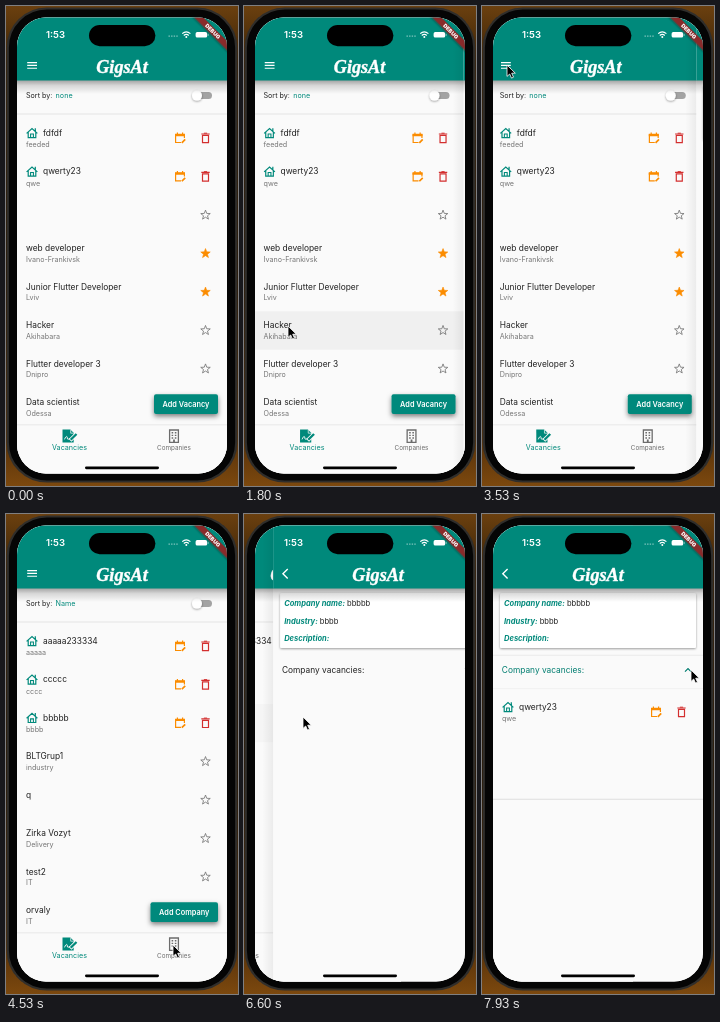
An HTML page for the animation above (8000 ms loop, 232 px wide and 480 px high).

```html
<!DOCTYPE html>
<html lang="en">
<head>
<meta charset="utf-8">
<title>Job board app</title>
<style>
  html, body { margin: 0; width: 100%; height: 100%; overflow: hidden; background: #2b1a06; }
  svg { display: block; width: 100vw; height: 100vh; }
  text { font-family: Inter, Roboto, sans-serif; white-space: pre; }
  .logo { font: italic bold 18.2px "Liberation Serif", "Noto Serif", serif; }
</style>
</head>
<body>
<svg id="stage" viewBox="0 0 232 480"></svg>
<script>
const LOOP = 8000, W = 210;
const TEAL = '#00897b', ORANGE = '#fb8c00', RED = '#d32f2f', GREY = '#757575', INK = '#212121', PAPER = '#fafafa';
const ROW = 38.45;

// Drawing helpers
const text = (x, y, s, size, fill = INK, more = '') =>
  `<text x="${x}" y="${y}" font-size="${size}" fill="${fill}" ${more}>${s}</text>`;
const rect = (x, y, w, h, fill, more = '') =>
  `<rect x="${x}" y="${y}" width="${w}" height="${h}" fill="${fill}" ${more}/>`;
const line = (d, color, width = 1, more = '') =>
  `<path d="${d}" fill="none" stroke="${color}" stroke-width="${width}" ${more}/>`;
const at = (x, y, body, more = '') => `<g transform="translate(${x} ${y})" ${more}>${body}</g>`;

// Icons, centred on 0,0
const house = line('M-5.4 .4L0-4.5 5.4.4M-3.8-1V4.6H3.8V-1M3.3-4.8V-1.8', TEAL, 1.2) +
  line('M-1.4 4.6V1H1.4V4.6', TEAL, 1.1);
const calendar = line('M1 4.5H-4.4V-3.6H4.4V0', ORANGE, 1.2) +
  line('M-5-2.8H5', ORANGE, 2) + line('M-2.6-5.4V-3M2.6-5.4V-3', ORANGE, 1.2) +
  line('M1.8 4.8L5.2 1.4', ORANGE, 1.7);
const bin = line('M-3-2.6V4.6H3V-2.6Z', RED, 1.2) +
  line('M-4.2-4H4.2', RED, 1.2) + line('M-1.6-4.8H1.6', RED, 1);
const starPath = 'M' + Array.from({ length: 10 }, (_, i) => {
  const r = i % 2 ? 2.1 : 5, a = i * Math.PI / 5;
  return (r * Math.sin(a)).toFixed(2) + ' ' + (-r * Math.cos(a)).toFixed(2);
}).join('L') + 'Z';
const star = full => full
  ? `<path d="${starPath}" fill="${ORANGE}" stroke="${ORANGE}" stroke-width=".6"/>`
  : line(starPath, '#777', .85);
const sheet = '<path d="M-7-6.5H.8L4.2-3.2V6.5H-7Z" fill="currentColor"/>' +
  line('M1.2-6V-2.8H4.2', PAPER, .7) +
  line('M-5 3.4C-3.4-.6-2.2 0-2.2 2S-.8 3.2.4 2.4', PAPER, .9) +
  line('M.6 4.4L7.4-2.4', PAPER, 4) + line('M1.2 3.8L7-2', 'currentColor', 2.3);
const tower = line('M-4.4-6H4.4V6.3H-4.4Z', 'currentColor', 1.3) +
  line('M-2.4-3.2H2.4M-2.4-.6H2.4M-2.4 2H2.4', 'currentColor', 1.4, 'stroke-dasharray="1.6"') +
  line('M0 6.4V3.6', 'currentColor', 1.8);

const header = back => rect(11, 74, W, 14, 'url(#drop)') + rect(11, 11, W, 63.5, TEAL) +
  (back ? line('M25.6 55L20.8 59.8 25.6 64.6', '#fff', 1.4)
        : line('M21.2 56.6H31M21.2 59.4H31M21.2 62.2H31', '#fff', 1.1)) +
  text(116, 66.5, 'GigsAt', 18.2, '#fff', 'class="logo" text-anchor="middle" stroke="#fff" stroke-width=".4"');

const tools = y => at(174, y, calendar) + at(199.5, y, bin);

// One list row: [title, subtitle, kind], kind is own | fav | plain
const row = ([title, sub, kind], i) => {
  const y = 127 + ROW * i, own = kind === 'own';
  return (own ? at(26, y, house) + tools(y + 5) : at(199.5, y + 5.2, star(kind === 'fav'))) +
    text(own ? 37 : 20, y + 3, title, 8.4) + text(20, y + (own ? 14.1 : 13.4), sub, 7.15, GREY);
};

const listBody = (sort, rows, button, bx) =>
  text(19.9, 92, 'Sort by:', 7.2) + text(49.6, 92, sort, 7.2, TEAL) +
  rect(187.5, 86, 18.5, 7, '#a3a3a3', 'rx="3.5"') +
  '<circle cx="191" cy="89.6" r="5" fill="#fff" filter="url(#soft)"/>' +
  rect(11, 107.6, W, .8, '#dedede') + rows.map(row).join('') +
  rect(bx, 388.3, 212 - bx, 19.7, TEAL, 'rx="2" filter="url(#raised)"') +
  text((bx + 212) / 2, 400.8, button, 7.35, '#fff', 'text-anchor="middle" font-weight="600"');

const vacancies = [
  ['fdfdf', 'feeded', 'own'], ['qwerty23', 'qwe', 'own'], ['', '', 'plain'],
  ['web developer', 'Ivano-Frankivsk', 'fav'], ['Junior Flutter Developer', 'Lviv', 'fav'],
  ['Hacker', 'Akihabara', 'plain'], ['Flutter developer 3', 'Dnipro', 'plain'],
  ['Data scientist', 'Odessa', 'plain']];
const companies = [
  ['aaaaa233334', 'aaaaa', 'own'], ['ccccc', 'cccc', 'own'], ['bbbbb', 'bbbb', 'own'],
  ['BLTGrup1', 'industry', 'plain'], ['q', '', 'plain'], ['Zirka Vozyt', 'Delivery', 'plain'],
  ['test2', 'IT', 'plain'], ['orvaly', 'IT', 'plain']];

const tab = (id, x, icon, label) => `<g id="${id}">` + at(x, 430, icon) +
  `<text x="${x}" y="443.7" text-anchor="middle" fill="currentColor">${label}</text></g>`;

const card = fields => rect(18, 79, 196, 55, '#fff', 'rx="1.5" filter="url(#soft)"') +
  fields.map(([name, value], i) =>
    `<text x="22" y="${92.1 + i * 17.6}" font-size="7.55" fill="${INK}">` +
    `<tspan fill="${TEAL}" font-weight="700" font-style="italic">${name}:</tspan> ${value}</text>`).join('');

document.getElementById('stage').innerHTML = `
<defs>
  <linearGradient id="wall" x2="0" y2="1">
    <stop offset="0" stop-color="#6b400f"/><stop offset=".12" stop-color="#3a2207"/>
    <stop offset=".55" stop-color="#2a1804"/><stop offset=".9" stop-color="#55310a"/>
    <stop offset="1" stop-color="#7c480e"/>
  </linearGradient>
  <linearGradient id="drop" x2="0" y2="1">
    <stop offset="0" stop-opacity=".36"/><stop offset=".4" stop-opacity=".14"/>
    <stop offset="1" stop-opacity="0"/>
  </linearGradient>
  <linearGradient id="edge">
    <stop offset="0" stop-opacity="0"/><stop offset="1" stop-opacity=".06"/>
  </linearGradient>
  <filter id="soft" x="-30%" y="-30%" width="160%" height="160%">
    <feDropShadow dx="0" dy=".9" stdDeviation=".9" flood-opacity=".4"/></filter>
  <filter id="raised" x="-20%" y="-60%" width="140%" height="240%">
    <feDropShadow dx="0" dy="2.4" stdDeviation="2.8" flood-opacity=".5"/></filter>
  <clipPath id="screen"><rect x="11" y="11.5" width="${W}" height="456" rx="29"/></clipPath>
  <clipPath id="fold"><rect id="foldBox" x="11" y="171" width="${W}" height="0"/></clipPath>
</defs>
${rect(0, 0, 232, 480, 'url(#wall)')}
${rect(1.8, 2.5, 228.4, 473, '#050505', 'rx="39" stroke="#302e2b" stroke-width="2.2"')}
<g clip-path="url(#screen)">
  ${rect(11, 11, W, 457, PAPER)}
  <g id="base">
    ${rect(11, 11, W, 457, PAPER)}
    ${rect(11, 0, W, ROW, '#000', 'id="press"')}
    <g id="vac">${listBody('none', vacancies, 'Add Vacancy', 148)}</g>
    <g id="com">${listBody('Name', companies, 'Add Company', 144.5)}</g>
    ${rect(11, 418.5, W, 50, PAPER)}${rect(11, 418.5, W, .8, '#e4e4e4')}
    ${tab('tabVac', 63.5, sheet, 'Vacancies')}${tab('tabCom', 168, tower, 'Companies')}
    ${header(false)}
  </g>
  <g id="detail">
    ${rect(0, 11, 11, 457, 'url(#edge)')}
    ${rect(11, 11, W, 457, PAPER)}
    <g id="job">${card([['Title', 'Hacker'], ['City', 'Akihabara'], ['Description', 'lorem ipsum']])}</g>
    <g id="firm">
      ${card([['Company name', 'bbbbb'], ['Industry', 'bbbb'], ['Description', '']])}
      ${text(19.8, 159, 'Company vacancies:', 8.35, INK, 'id="foldTitle"')}
      <g id="arrow">${line('M-3-1.6L0 1.4 3-1.6', 'currentColor', 1.2)}</g>
      <g clip-path="url(#fold)"><g id="foldBody">
        ${rect(11, 174.5, W, .6, '#ececec')}
        ${at(0, 66, row(['qwerty23', 'qwe', 'own'], 0))}
      </g></g>
      <g id="rules">${rect(11, 140.8, W, .7, '#e4e4e4')}<rect id="foldEnd" x="11" width="${W}" height=".8" fill="#d8d8d8"/></g>
    </g>
    ${header(true)}
  </g>
  ${text(40, 32.2, '1:53', 9.6, '#fff', 'font-weight="600"')}
  ${line('M162.5 30.2H172', '#fff', 1.2, 'stroke-dasharray="1.4 1.2" opacity=".5"')}
  ${line('M176.2 27.6Q180.3 24 184.4 27.6M177.8 29.5Q180.3 27.4 182.8 29.5', '#fff', 1.2)}
  <circle cx="180.3" cy="31" r="1" fill="#fff"/>
  ${rect(189.6, 26, 11.6, 5.6, '#fff', 'rx="1.7"')}${rect(201.8, 27.8, .8, 2, '#fff', 'opacity=".6"')}
  <g transform="translate(221 11) rotate(45)">
    ${rect(-32, 17, 64, 6.4, '#8a2a2c', 'filter="url(#soft)"')}
    ${text(0, 22.1, 'DEBUG', 5.4, '#fff', 'text-anchor="middle" font-weight="900"')}
  </g>
  ${rect(79, 460.5, 74, 2.7, '#000', 'rx="1.35"')}
</g>
${rect(83, 19, 66.4, 21.2, '#000', 'rx="10.6"')}
<path id="cursor" d="M0 0V11.4L2.7 9 4.5 13.1 6.5 12.2 4.7 8.2H8.3Z" fill="#000" stroke="#fff" stroke-width=".8"/>`;

const el = id => document.getElementById(id);
const set = (id, name, value) => el(id).setAttribute(name, value);
const show = (id, on) => set(id, 'display', on ? 'inline' : 'none');
const move = (id, x, y) => set(id, 'transform', `translate(${x.toFixed(2)} ${y.toFixed(2)})`);
const span = (t, a, b) => Math.min(1, Math.max(0, (t - a) / (b - a)));
const smooth = k => k * k * (3 - 2 * k);
const mix = (a, b, k) => a + (b - a) * k;

function bezier(x1, y1, x2, y2) {
  const f = (s, a, b) => 3 * s * (1 - s) ** 2 * a + 3 * s * s * (1 - s) * b + s ** 3;
  return x => {
    if (x <= 0 || x >= 1) return x;
    let lo = 0, hi = 1;
    for (let i = 0; i < 24; i++) {
      const s = (lo + hi) / 2;
      if (f(s, x1, x2) < x) lo = s; else hi = s;
    }
    return f((lo + hi) / 2, y1, y2);
  };
}
const slide = bezier(.35, .91, .33, .97), easeIn = bezier(.42, 0, 1, 1);

// Pointer stops: time, x, y
const stops = [
  [600, 236, 452], [1300, 44, 320], [2150, 44, 320], [2800, 14, 71], [3060, 22, 59],
  [3330, 24, 59], [3530, 25, 59], [3720, 25, 59], [4330, 167, 431], [5070, 167, 431],
  [5870, 88, 206], [6150, 59, 203], [6820, 59, 203], [7560, 209, 156], [8000, 209, 156]];
function pointer(t) {
  const i = stops.findIndex(s => s[0] > t);
  if (i < 1) return stops[0].slice(1);
  const [t0, x0, y0] = stops[i - 1], [t1, x1, y1] = stops[i], k = smooth(span(t, t0, t1));
  return [mix(x0, x1, k), mix(y0, y1, k)];
}

const tint = k => `rgb(${mix(108, 0, k)},${mix(108, 137, k)},${mix(108, 123, k)})`;
function paintTab(id, k) {
  set(id, 'color', tint(k));
  set(id, 'font-size', mix(6.35, 7.2, k));
}

function draw(t) {
  const open = slide(span(t, 1800, 2200)) - slide(span(t, 3270, 3670)) + slide(span(t, 6406, 6806));
  move('base', -W / 3 * open, 0);
  move('detail', W * (1 - open), 0);
  show('detail', open > 0);
  const late = t >= 4460;
  show('vac', !late); show('com', late);
  show('job', !late); show('firm', late);

  const picked = span(t, 4540, 4740);
  paintTab('tabVac', 1 - picked);
  paintTab('tabCom', picked);

  // Row highlight while pressed
  set('press', 'y', 113 + ROW * (late ? 2 : 5));
  const pushed = late ? 6406 : 1800;
  set('press', 'opacity', .04 * (span(t, pushed - 100, pushed) - span(t, pushed + 100, pushed + 300)));

  const k = easeIn(span(t, 7710, 7910)), h = 114 * k;
  set('foldBox', 'height', h);
  move('foldBody', 0, (h - 114) / 2);
  set('foldEnd', 'y', 170.8 + h);
  set('rules', 'opacity', k);
  const ink = `rgb(${33 * (1 - k)},${mix(33, 125, k)},${mix(33, 112, k)})`;
  set('foldTitle', 'fill', ink);
  set('arrow', 'color', ink);
  set('arrow', 'transform', `translate(206 156) rotate(${-180 * k})`);

  move('cursor', ...pointer(t));
}

const start = performance.now();
function tick() {
  draw((performance.now() - start) % LOOP);
  requestAnimationFrame(tick);
}
tick();
</script>
</body>
</html>
```
